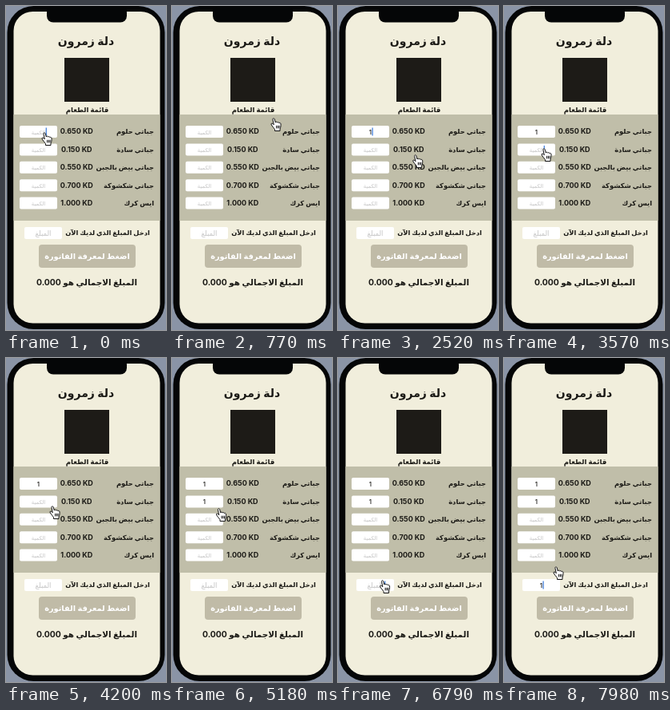
Write an HTML page that moves like this. It is 200 px wide and 406 px high and loops after 8000 ms.

```html
<!DOCTYPE html>
<html lang="ar">
<meta charset="utf-8">
<title>Cafe order form</title>
<style>
  html, body { margin: 0; height: 100%; overflow: hidden; background: #8a94a6; }
  svg { display: block; width: 200px; height: 406px; }
  text { font-family: Inter, "DejaVu Sans", sans-serif; font-weight: 700; fill: #1b1a16; text-anchor: middle; }
  .item { text-anchor: start; }
  .button { fill: #fff; }
  .hint { font-weight: 400; fill: #c4c4c4; }
  .typed { font-weight: 500; }
  .typed, .caret { opacity: 0; }
</style>
<svg viewBox="0 0 200 406">
  <rect x="1.500" y="0" width="197" height="405" rx="33" fill="#050607"/>
  <rect x="9.500" y="7" width="183" height="390.500" rx="24" fill="#f1eedc"/>
  <rect x="51" y="0" width="100" height="20.500" rx="8" fill="#050607"/>
  <rect x="73" y="65" width="56" height="55" fill="#1d1b17"/>
  <rect x="9.500" y="136" width="183" height="133" fill="#c0bea9"/>
  <rect x="41" y="299" width="121" height="29" rx="4" fill="#c0bba7"/>
  <g id="form"></g>
  <path id="hand" fill="#fff" stroke="#111" stroke-linejoin="round"
    d="M5.500 16.500V14.500C4 12.500 2.500 11 1.300 9C.3 7.300 1.800 6.500 3 7.500L4.300 8.800L3 2.500C2.700.4 4.700.1 5.200 2L6.300 6C6.500 4.700 8.300 4.800 8.600 6.200C9 5.200 10.600 5.500 10.900 6.700C11.500 6 12.900 6.400 13 7.800C13.200 10.500 12.900 12 12 14V16.500ZM7.600 9.800V13.300M9.400 9.800V13.300M11.100 9.800V13.300"/>
</svg>
<script>
const form = document.getElementById('form');
const hand = document.getElementById('hand');

function add(tag, attrs, content = '') {
  const el = document.createElementNS('http://www.w3.org/2000/svg', tag);
  for (const key in attrs) el.setAttribute(key, attrs[key]);
  el.textContent = content;
  return form.appendChild(el);
}

function label(content, x, y, size, style = '') {
  const direction = /[\u0600-\u06ff]/.test(content) ? 'rtl' : 'ltr';
  return add('text', { x, y, direction, 'font-size': size, class: style }, content);
}

function field(x, y, hint, size) {
  const center = x + 23.5;
  add('rect', { x, y, width: 47, height: 15, rx: 2, fill: '#fff' });
  return {
    center,
    hintEnd: center + size * 1.35,
    hint: label(hint, center, y + 10.5, size, 'hint'),
    typed: label('1', center, y + 10.7, 8, 'typed'),
    caret: add('rect', { y: y + 2.5, width: 1.2, height: 10, fill: '#3677d8', class: 'caret' })
  };
}

label('دلة زمرون', 100, 48.5, 14);
label('قائمة الطعام', 101.5, 132.5, 8.5);
const menu = {
  'جباتي حلوم': '0.650', 'جباتي سادة': '0.150', 'جباتي بيض بالجبن': '0.550',
  'جباتي شكشوكة': '0.700', 'ايس كرك': '1.000'
};
const quantities = Object.entries(menu).map(([name, price], row) => {
  const y = 150 + row * 22.4;
  label(name, 185, y + 10.3, 8.4, 'item');
  label(price + ' KD', 88.3, y + 10.3, 9);
  return field(17, y, 'الكمية', 6.8);
});
label('ادخل المبلغ الذي لديك الآن', 127, 287, 8.3);
label('اضغط لمعرفة الفاتورة', 101.5, 316.8, 9.8, 'button');
label('المبلغ الاجمالي هو 0.000', 101, 350, 10.4);
const amount = field(23, 277, 'المبلغ', 8.6);

const entries = [
  { input: quantities[0], focus: -110, typing: 2170, blur: 3570 },
  { input: quantities[1], focus: 3570, typing: 4550, blur: 6300 },
  { input: amount, focus: 6510, typing: 7840, blur: 8000 }
];
const home = { x: 44, y: 158 };
const moves = [
  { start: 280, end: 770, x: 123, y: 140 },
  { start: 2310, end: 2800, x: 46, y: 192, bow: 27 },
  { start: 2870, end: 3290, x: 46, y: 178 },
  { start: 3780, end: 4200, x: 54, y: 185 },
  { start: 5110, end: 5740, x: 68, y: 270 },
  { start: 5740, end: 6160, x: 51, y: 279 },
  { start: 6720, end: 7210, x: 61, y: 261 }
];

const clamp = v => Math.max(0, Math.min(1, v));
const smooth = v => v * v * (3 - 2 * v);

function pointerAt(t) {
  return moves.reduce((from, { start, end, x, y, bow = 0 }) => {
    const k = smooth(clamp((t - start) / (end - start)));
    return {
      x: from.x + (x - from.x) * k,
      y: from.y + (y - from.y) * k + bow * Math.sin(Math.PI * k)
    };
  }, home);
}

// The blink restarts on focus and on typing.
const blink = age => clamp(0.5 + 3 * Math.sin(2 * Math.PI * (age + 70) / 1300));

function draw() {
  const t = Math.floor(performance.now() % 8000 / 70) * 70;
  const { x, y } = pointerAt(t);
  hand.setAttribute('transform', `translate(${x} ${y})`);
  for (const { input, focus, typing, blur } of entries) {
    const isTyped = t >= typing;
    input.hint.style.opacity = +!isTyped;
    input.typed.style.opacity = +isTyped;
    input.caret.setAttribute('x', isTyped ? input.center + 2 : input.hintEnd);
    input.caret.style.opacity = t >= focus && t < blur ? blink(t - (isTyped ? typing : focus)) : 0;
  }
  requestAnimationFrame(draw);
}
draw();
</script>
</html>
```
